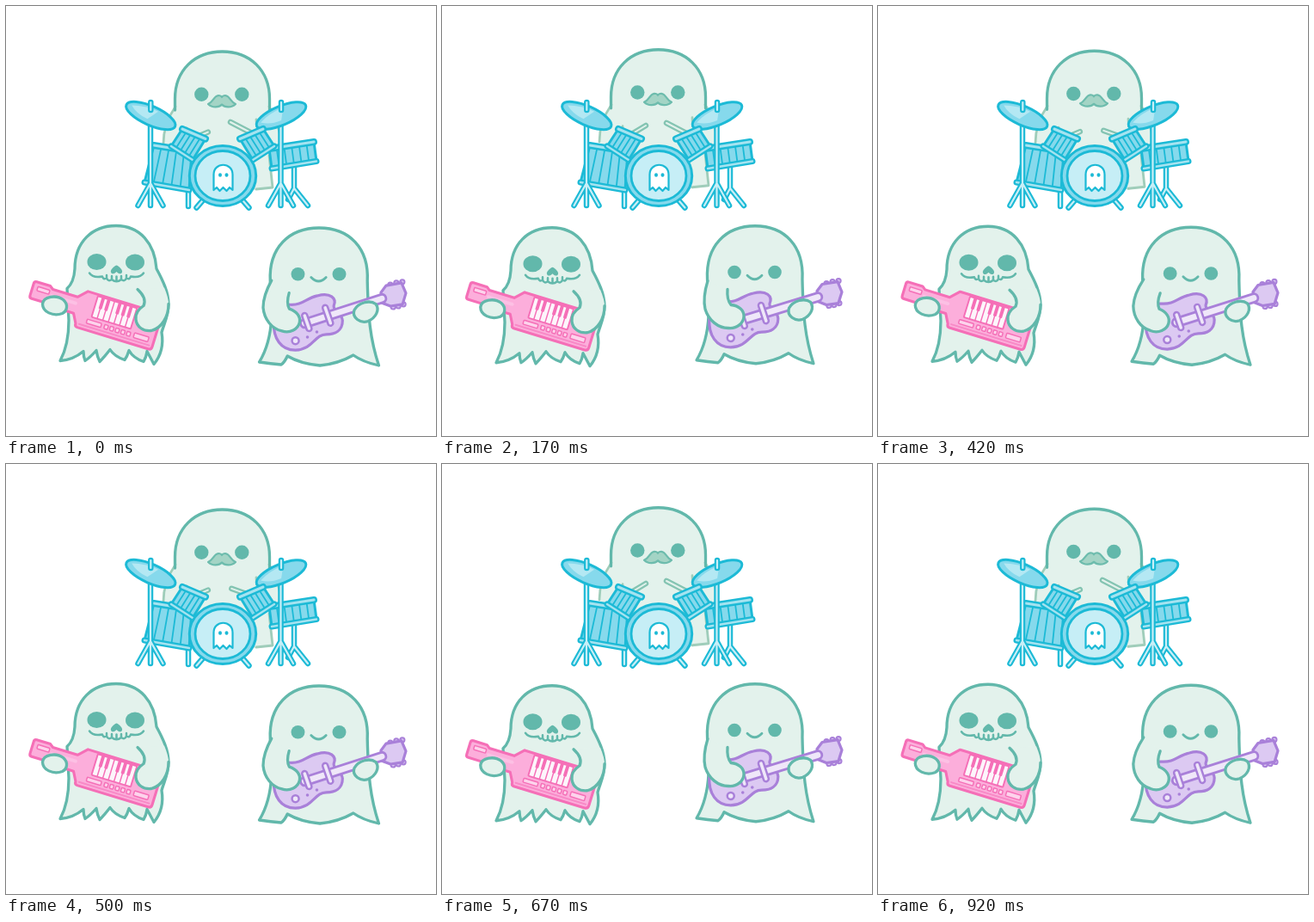
Write an HTML page that moves like this. It is 500 px wide and 500 px high and loops after 1010 ms.

```html
<!DOCTYPE html>
<html lang="en">
<head>
<meta charset="utf-8">
<title>Ghost band</title>
<style>
  html, body { margin: 0; width: 100%; height: 100%; overflow: hidden; background: #fff; }
  svg { display: block; width: 100vw; height: 100vh; stroke-linecap: round; stroke-linejoin: round; }
  .ghost { fill: #e3f2ec; stroke: #62b8ab; stroke-width: 3.3; }
  .line { fill: none; stroke: #62b8ab; stroke-width: 3.3; }
  .soft { fill: none; stroke: #9fcdba; stroke-width: 2.8; }
  .bare { stroke: none; }
  .face { fill: #62b8ab; }
  .drum { fill: #86d9ec; stroke: #1cbad6; stroke-width: 3; }
  .pale { fill: #c6eef6; stroke: #1cbad6; stroke-width: 2.8; }
  .pink { fill: #fcaedb; stroke: #f56fb7; stroke-width: 3.2; }
  .lilac { fill: #dcc9f2; stroke: #a980d9; stroke-width: 3.2; }
</style>
</head>
<body>
<svg id="stage" viewBox="0 0 500 500"></svg>
<script>
const STARTS = [0, 80, 170, 250, 330, 420, 500, 580, 670, 750, 840, 920];
const LOOP = 1010;
const stage = document.getElementById('stage');

const path = (cls, d, extra = '') => `<path class="${cls}" d="${d}" ${extra}/>`;
const oval = (cls, x, y, rx, ry = rx, extra = '') =>
  `<ellipse class="${cls}" cx="${x}" cy="${y}" rx="${rx}" ry="${ry}" ${extra}/>`;
const box = (x, y, w, h, extra) =>
  `<rect x="${x}" y="${y}" width="${w}" height="${h}" rx="1" ${extra}/>`;
const group = (id, content, transform = '') => `<g id="${id}" transform="${transform}">${content}</g>`;

// A thin bar: outline stroke with a paler stroke inside.
const bar = (d, edge = '#1cbad6', core = '#c9eff7', w = 6.5, inner = 2.2) =>
  `<g fill="none"><path d="${d}" stroke="${edge}" stroke-width="${w}"/>` +
  `<path d="${d}" stroke="${core}" stroke-width="${inner}"/></g>`;

// Evenly spaced lines between two edges of a shell.
function stripes(n, [x1, y1, x2, y2], [x3, y3, x4, y4]) {
  let d = '';
  for (let i = 1; i < n; i++) {
    const u = i / n;
    d += `M${x1 + (x2 - x1) * u} ${y1 + (y2 - y1) * u}L${x3 + (x4 - x3) * u} ${y3 + (y4 - y3) * u}`;
  }
  return path('', d, 'fill="none" stroke="#1cbad6" stroke-width="1.8"');
}

function shell(top, bottom, n) {
  const [a, b, c, d] = top, [e, f, g, h] = bottom;
  return path('drum', `M${a} ${b}L${c} ${d}L${g} ${h}L${e} ${f}Z`) + stripes(n, top, bottom) +
    bar(`M${a} ${b}L${c} ${d}`, '#1cbad6', '#a5e3f0', 8, 3) +
    bar(`M${e} ${f}L${g} ${h}`, '#1cbad6', '#a5e3f0', 7, 2.4);
}

function cymbal(x, tilt) {
  return group('', oval('drum', 0, 0, 31, 11) +
    path('', 'M-25 -2Q-12 -8 6 -8L-2 5Q-16 5 -25 -2Z', 'fill="#b4e8f3"'),
    `translate(${x} 127.5) rotate(${tilt})`) + bar(`M${x} 112V121`);
}

const stand = x => bar(`M${x} 135V208M${x} 206L${x - 14.5} 232M${x} 206V232M${x} 206L${x + 14.5} 232`);

const stick = (id, d) => group(id, bar(d, '#84c4b2', '#e3f2ec', 6.5, 2));

function drummer() {
  return group('drummer',
    path('ghost bare', 'M196.500 118V106C196.500 73 219 51 251.500 51S306.500 73 306.500 106V118C315 130 320 145 318 160L306 168 310 210 292 212H205L196 175 183 158C183 143 188 131 196.500 118Z', 'style="stroke:none"') +
    path('soft', 'M197 115C188 128 183 143 183 158M306 115C315 130 319 142 319 155M306 172L310 209 291 211M210 140Q211 148 204 156M291 130Q291 143 298 151') +
    path('line', 'M196.500 119V106C196.500 73 219 51 251.500 51S306.500 73 306.500 106V119') +
    oval('face', 227.3, 100.7, 8.2) + oval('face', 274.3, 100.7, 8.2) +
    path('', 'M235 112C241 110 241 103 247 102Q250 102 251 104Q252 102 255 102C261 103 261 110 267 112C262 117 254 116 251 112.500C248 116 240 117 235 112Z',
      'fill="#a3d4c5" stroke="#6dbcad" stroke-width="2.200"')) +
    stick('stickL', 'M237 139L212 154') + stick('stickR', 'M261 135L288 149');
}

function kit() {
  return bar('M212 214V233M335 188V212L351 232M335 212L328 225') +
    shell([172, 162, 216, 169], [161, 205, 213, 214], 5) +
    shell([306, 166, 358, 158], [309, 189, 361, 180.5], 6) +
    stand(168) + stand(319.5) + cymbal(168.3, 24) + cymbal(320, -23) +
    shell([205, 143, 232, 154.5], [192, 163, 217, 179], 5) +
    shell([272, 154.5, 299, 143], [287, 179, 312, 163], 5) +
    bar('M228 227L221.500 234.500M276 227L282.500 234.500') +
    oval('drum', 252, 197.5, 38.7, 35) + oval('pale', 252, 197.5, 32, 29) +
    path('', 'M241.500 214V196C241.500 181 263.500 181 263.500 196V214L260 211 256.500 215 252.500 211 248.500 215 245 211Z',
      'fill="#fff" stroke="#1cbad6" stroke-width="2.200"') +
    oval('', 249, 196.5, 2, 2.3, 'fill="#1cbad6"') + oval('', 256.5, 196.5, 2, 2.3, 'fill="#1cbad6"');
}

function keytar() {
  const trim = 'fill="#fdd3ec" stroke="#f56fb7" stroke-width="1.500"';
  let keys = box(15, 2, 49, 26, 'fill="#fdf5fb" stroke="#f56fb7" stroke-width="2"');
  for (let i = 1; i < 7; i++) {
    keys += path('', `M${15 + i * 7} 3V28`, 'stroke="#f56fb7" stroke-width="1.500"');
    if (i != 3) keys += box(13 + i * 7, 2, 4, 14, 'fill="#f56fb7"');
  }
  let buttons = '';
  for (let i = 0; i < 5; i++) buttons += box(33 + i * 7, 32, 4.5, 5, trim);
  return group('keytar', group('',
    path('pink', 'M-60 7H-43L-39 10H-8L2 0H92Q95 0 95 4V41Q95 45 91 45H2Q-1 45 -1 41L-7 30H-39L-43 28H-60Q-63 28 -63 25V10Q-63 7 -60 7Z') +
    path('', 'M3 40.500H91', 'stroke="#f88ac7" stroke-width="2"') +
    box(-57, 12, 15, 5, trim) +
    path('', 'M-38 18H-8', 'stroke="#fcc0e4" stroke-width="4"') +
    keys + box(11, 32, 18, 5, trim) + buttons + box(70, 31, 18, 6, trim),
    'translate(94 332) rotate(17) scale(.97)'));
}

function keyboardist() {
  const arm = 'M153 332Q164 342 160 351C154 355 150 360 151 367C152 376 160 381 169 380C181 377 189 364 189 349';
  return group('keyBody',
    path('ghost', 'M80 308C80 277 100 258 128 258S173 279 175 308C182 321 189 335 189 349C189 363 184 371 181 382C183 394 181 408 172 419L164 404Q163 411 160 416Q148 412 143 403Q141 410 138 414Q126 410 121 402Q114 411 109 416Q106 410 105 403Q98 411 92 415Q90 410 90 404Q78 414 63 415C70 402 73 386 73 368L71 331Q79 324 80 308Z') +
    oval('face', 105.5, 300, 11, 9.5) + oval('face', 150, 300.5, 11, 9.5) +
    path('face', 'M128.500 304C132 305 136 310 135 312C134 315 131 314 128.500 311.500C126 314 123 315 122 312C121 310 125 305 128.500 304Z') +
    path('line', 'M97 313Q101 319 112 317Q113 321 117 319Q119 323.500 123 320.500Q128.500 325 134 320.500Q138 323.500 140 319Q144 321 145 317Q156 319 160 313M117 319V315.500M123 320V316.500M128.500 322V317M134 320V316.500M140 319V315.500', 'style="stroke-width:2.5"')) +
    keytar() +
    group('keyHand', path('ghost', 'M44 349C45 340 60 338 68 344C74 349 73 357 67 360C56 364 44 358 44 349Z')) +
    group('keyArm', path('ghost', arm + 'Q189 342 184 330', 'style="stroke:none"') + path('line', arm));
}

function guitar() {
  const peg = ([x, y]) => oval('lilac', x, y, 2.6, 2.6, 'style="stroke-width:2"');
  return group('guitar',
    [[447, 322], [454, 320], [461, 319], [450, 348], [456, 347], [462, 345]].map(peg).join('') +
    path('lilac', 'M436 331L442 323 460 320 465 332 461 345 447 347 437 343Z') +
    path('lilac', 'M330 344C345 345 348 337 362 334C377 330 385 337 381 346C380 352 390 353 391 363C391 375 382 379 372 379C358 379 357 396 336 397C319 397 310 383 311 364C312 349 317 343 330 344Z') +
    bar('M347 366L437 338', '#a980d9', '#efe7f9', 12.5, 6.8) +
    bar('M347 357L352 372M371 348L377 366', '#a980d9', '#efe7f9', 8.5, 3.5) +
    oval('', 336, 386, 4, 4, 'fill="#efe7f9" stroke="#a980d9" stroke-width="2.500"') +
    oval('', 350, 382, 1.8, 1.8, 'fill="#a980d9"') + oval('', 361, 376, 1.8, 1.8, 'fill="#a980d9"'));
}

function guitarist() {
  const arm = 'M309 320C305 333 304 344 306 353C310 366 321 375 333 375C343 376 351 369 351 361C351 354 345 349 336 348Q331 342 332 330';
  return group('guitarBody',
    path('ghost', 'M308.500 318C306.500 279 330 256 364 256S421 279 419 318C420 360 422 385 432 416Q414 412 403 404Q386 414 365 416Q343 414 328 405Q325 412 321 415Q309 414 296 412C305 397 309 380 310 360Z') +
    oval('face', 340, 309.7, 7.8) + oval('face', 387, 309.7, 7.8) +
    path('line', 'M355 313.500Q363.500 322.500 372 313.500', 'style="stroke-width:2.800"')) +
    guitar() +
    group('strum', path('ghost', arm, 'style="stroke:none"') + path('line', arm)) +
    group('fretHand', path('ghost', 'M404 352C409 343 422 340 429 345C434 352 429 361 420 365C411 368 401 361 404 352Z'));
}

stage.innerHTML = drummer() + kit() + keyboardist() + guitarist();

const move = (id, transform) => document.getElementById(id).setAttribute('transform', transform);

function pose(step) {
  const wave = lag => Math.cos((step - lag) * Math.PI / 3);
  const bob = wave(0), swing = wave(2);
  const beatL = bob > 0, beatR = step > 4 && step < 8;
  const lift = `translate(0 ${-1 - 1.5 * bob})`;
  move('drummer', `translate(0 ${0.5 + 1.5 * bob})`);
  move('stickL', beatL ? `translate(-4 ${3 + bob}) rotate(8 212 154)` : '');
  move('stickR', beatR ? 'translate(3 6) rotate(-8 288 149)' : `translate(0 ${bob < 0 ? 1 : 0})`);
  move('keyBody', lift);
  move('keyArm', lift);
  move('keytar', `translate(${-0.5 * bob} ${-0.7 * bob})`);
  move('keyHand', `translate(${-1.5 * bob} ${-2.5 * bob})`);
  move('guitarBody', `translate(364 ${0.5 + 1.5 * bob}) scale(${1.007 + 0.015 * bob} 1) translate(-364 0)`);
  move('guitar', `translate(0 ${1 + bob}) rotate(${-0.6 * bob} 450 333)`);
  move('strum', `translate(0 ${bob}) rotate(${8 * (1 - swing)} 318 318)`);
  move('fretHand', `translate(${bob} ${1.5 * bob})`);
}

function tick(now) {
  const t = now % LOOP;
  pose(STARTS.findLastIndex(s => s <= t));
  requestAnimationFrame(tick);
}
pose(0);
requestAnimationFrame(tick);
</script>
</body>
</html>
```
